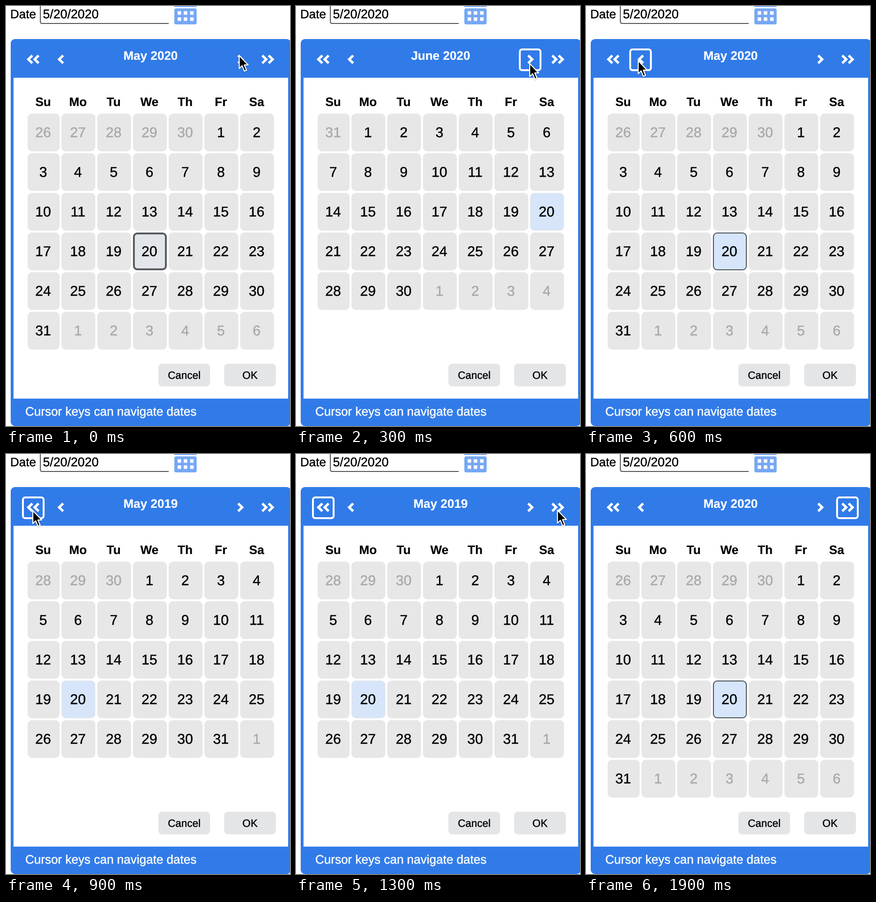
Animation of 604 by 890 pixels, one loop 2000 ms. Source, as an HTML page:

```html
<!DOCTYPE html>
<html lang="en">
<head>
<meta charset="utf-8">
<title>Date picker</title>
<style>
  html, body { margin: 0; width: 100%; height: 100%; overflow: hidden; background: #fff; }
  svg { display: block; width: 604px; height: 890px; }
  text {
    font: 26px "Liberation Sans", Arial, Helvetica, sans-serif;
    text-rendering: geometricPrecision;
    fill: currentColor; stroke: currentColor; stroke-width: .45px;
  }
  .mid { text-anchor: middle; }
  .bold { font-weight: bold; stroke-width: .2px; }
  .field { font-size: 26.67px; }
  .day { font-size: 30px; }
  .btn { font-size: 22.4px; }
  .line { fill: none; stroke: #fff; }
</style>
</head>
<body>
<svg id="stage" viewBox="0 0 604 890"></svg>
<script>
const LOOP = 2000, STEP = 100;
const BLUE = '#317be9', GREY = '#e7e7e7';
const stage = document.getElementById('stage');

function add(parent, tag, attrs, text) {
  const el = document.createElementNS('http://www.w3.org/2000/svg', tag);
  set(el, attrs);
  if (text !== undefined) el.textContent = text;
  parent.appendChild(el);
  return el;
}
function set(el, attrs) {
  for (const key in attrs) el.setAttribute(key, attrs[key]);
}
function rect(x, y, width, height, fill, rx = 0) {
  return add(stage, 'rect', { x, y, width, height, fill, rx });
}
function label(x, y, text, cls = '', color = '#000') {
  return add(stage, 'text', { x, y, class: cls, color }, text);
}
function chevron(x, dir) {
  add(stage, 'path', {
    d: `M${x - dir * 4.2} 104.8L${x + dir * 4.2} 113L${x - dir * 4.2} 121.2`,
    class: 'line', 'stroke-width': 5.2
  });
}

// Date field and its button
label(9, 26, 'Date');
add(stage, 'path', {
  d: 'M73 0V33Q73 37 77 37H346', fill: 'none', stroke: '#555', 'stroke-width': 2
});
label(78.5, 26, '5/20/2020', 'field');
rect(358, -8, 47.5, 10, '#76a8f5');
rect(358, 5, 47.5, 34, '#76a8f5', 4);
for (const y of [11, 24])
  for (const x of [365, 378, 391.5]) rect(x, y, 7.5, 7.5, '#fff', 1);

// Dialog
rect(10, 70, 596, 820, BLUE, 9);
rect(16, 152, 584, 680, '#fff');
const title = label(307.5, 114, '', 'mid bold', '#fff');
[51.8, 65.2, 117.3].forEach(x => chevron(x, -1));
[498, 549.2, 562.8].forEach(x => chevron(x, 1));
const ring = add(stage, 'rect', {
  y: 92, width: 44, height: 44, rx: 5, class: 'line', 'stroke-width': 4
});
label(41, 868, 'Cursor keys can navigate dates', '', '#fff');
[[324, 379, 'Cancel'], [464, 519, 'OK']].forEach(([x, mid, text]) => {
  rect(x, 758, 110, 48, '#e3e5e7', 8);
  label(mid, 790, text, 'mid btn');
});

// Day grid
const colX = c => c ? 42 + c * 76 : 46;
const colMid = c => c ? 77 + c * 76 : 79;
['Su', 'Mo', 'Tu', 'We', 'Th', 'Fr', 'Sa'].forEach((name, c) =>
  label(colMid(c), 212, name, 'mid bold'));

const cells = Array.from({ length: 42 }, (_, i) => {
  const c = i % 7, y = 228 + Math.floor(i / 7) * 84;
  return {
    x: colX(c), y, w: c ? 72 : 68,
    box: rect(0, 0, 0, 0, GREY, 9),
    num: label(colMid(c), y + 50, '', 'mid day')
  };
});

function paintCell(cell, fill, stroke, width) {
  set(cell.box, {
    x: cell.x + width / 2, y: cell.y + width / 2,
    width: cell.w - width, height: 80 - width,
    fill, stroke, 'stroke-width': width, rx: 9 - width / 2
  });
}

function showMonth(year, month, focused) {
  const first = new Date(year, month, 1).getDay();
  const days = new Date(year, month + 1, 0).getDate();
  const shown = Math.ceil((first + days) / 7) * 7;
  title.textContent = `${month === 4 ? 'May' : 'June'} ${year}`;
  cells.forEach((cell, i) => {
    const date = new Date(year, month, i - first + 1);
    const inside = date.getMonth() === month;
    const visibility = i < shown ? 'visible' : 'hidden';
    set(cell.box, { visibility });
    set(cell.num, { visibility, color: inside ? '#000' : '#a8a8a8' });
    cell.num.textContent = date.getDate();
    const picked = year === 2020 && month === 4;
    if (!inside || date.getDate() !== 20) paintCell(cell, GREY, 'none', 0);
    else if (focused) paintCell(cell, '#e2e5e9', '#595c60', 4);
    else paintCell(cell, '#d6e5fa', picked ? '#4c5056' : '#dfe5ee', 2);
  });
}

// Mouse pointer
const pointer = add(stage, 'path', {
  d: 'M0 0V27.5L6.2 21.6L11 33L15.6 31L10.8 19.8H19Z',
  fill: '#000', stroke: '#fff', 'stroke-width': 2.2, 'stroke-linejoin': 'round',
  style: 'filter:drop-shadow(0 1px 1px rgba(0,0,0,.3))'
});

// [start ms, year, month, ring x]
const views = [
  [0, 2020, 4, null], [200, 2020, 5, 476], [600, 2020, 4, 94],
  [900, 2019, 4, 36], [1400, 2020, 4, 534]
];
// [ms, x, y]
const moves = [
  [0, 496, 105], [100, 497, 122], [300, 497, 122], [500, 111, 116], [700, 111, 116],
  [800, 57, 120], [1000, 57, 120], [1300, 556, 119], [1500, 556, 119], [1800, 443, 838]
];

function pointerAt(t) {
  const i = moves.findIndex(m => m[0] > t);
  if (i < 0) return moves[moves.length - 1].slice(1);
  const [t0, x0, y0] = moves[i - 1], [t1, x1, y1] = moves[i];
  const u = (t - t0) / (t1 - t0), k = u * u * (3 - 2 * u);
  return [x0 + (x1 - x0) * k, y0 + (y1 - y0) * k];
}

let current = null;
function render(ms) {
  const t = Math.floor(ms % LOOP / STEP) * STEP;
  const view = views.filter(v => v[0] <= t).pop();
  if (view !== current) {
    current = view;
    const [, year, month, x] = view;
    showMonth(year, month, x === null);
    set(ring, { x: x || 0, visibility: x === null ? 'hidden' : 'visible' });
  }
  const [px, py] = pointerAt(t);
  set(pointer, {
    transform: `translate(${px} ${py})`,
    visibility: t < 1900 ? 'visible' : 'hidden'
  });
}

let start = null;
function tick(now) {
  if (start === null) start = now;
  render(now - start);
  requestAnimationFrame(tick);
}
render(0);
requestAnimationFrame(tick);
</script>
</body>
</html>
```
